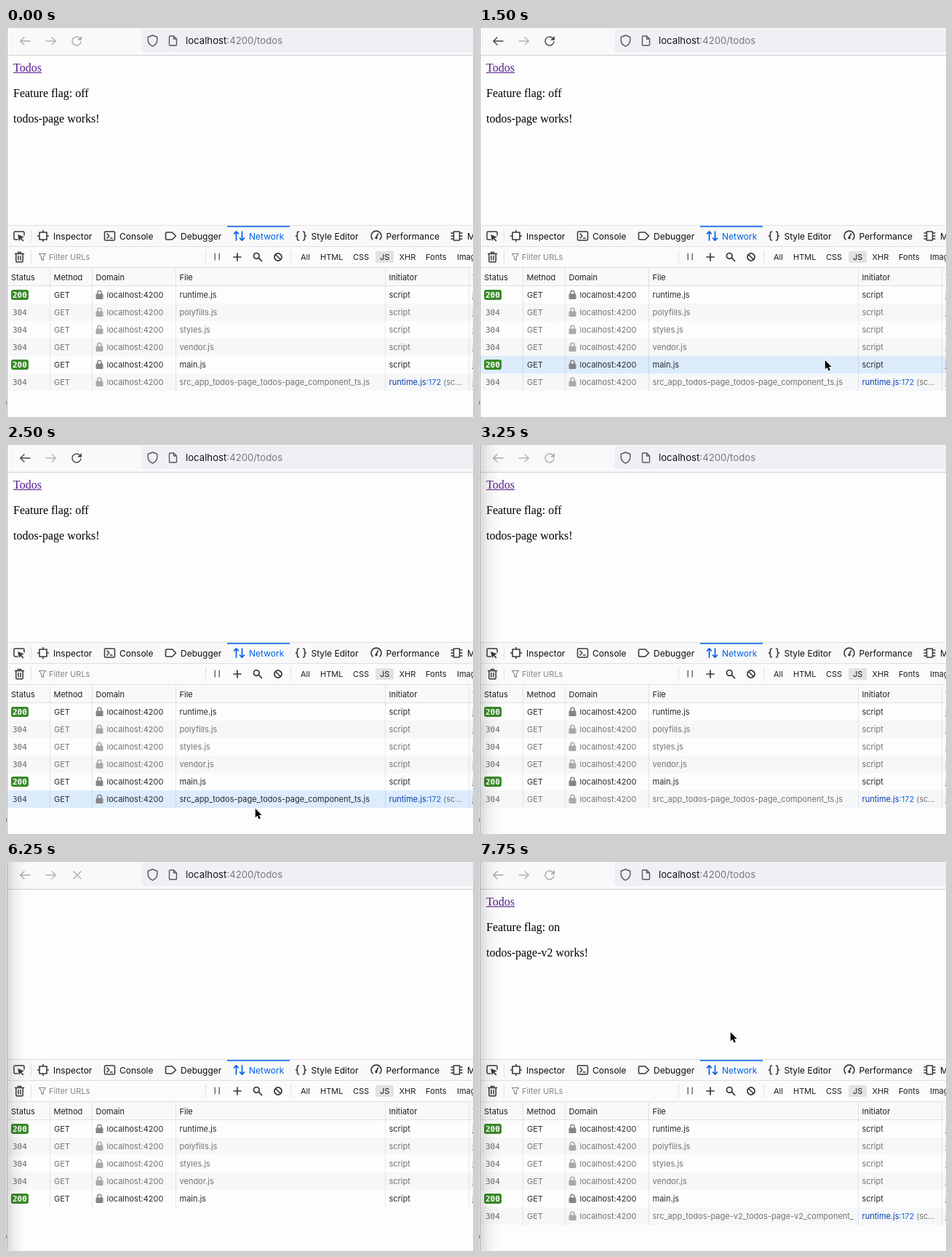
An HTML page with a canvas for the animation above (8000 ms loop, 642 by 535 pixels).

```html
<!DOCTYPE html>
<html lang="en">
<head>
<meta charset="utf-8">
<title>Feature flag and lazy routes</title>
<style>
html, body { margin: 0; width: 100%; height: 100%; overflow: hidden; background: #fdfdfd; }
canvas { display: block; }
</style>
</head>
<body>
<canvas id="stage" width="642" height="535"></canvas>
<script>
const ctx = document.getElementById('stage').getContext('2d');
const W = 642, H = 535, LOOP = 8000;
const UI = 'Inter, sans-serif', MONO = '"DejaVu Sans Mono", monospace', SERIF = '"Liberation Serif", serif';
const INK = '#0c0c0d', ICON = '#38383d', GRAY = '#737373', RULE = '#e0e0e2', BLUE = '#0060df';

// Pointer track: [time, x, y], hidden where x is missing
const POINTER = [
  [0], [250, 635, 149], [500, 541, 172], [1000, 495, 157], [1250, 455, 274],
  [1500, 475, 456], [1750, 408, 489], [2000, 336, 495], [2250, 354, 488],
  [2500, 342, 499], [2750], [7750, 345, 233]
];
const COLUMNS = [60, 118, 233, 521, 636];
const FILES = ['runtime.js', 'polyfills.js', 'styles.js', 'vendor.js', 'main.js'];

const within = (t, a, b) => t >= a && t < b;

function rect(x, y, w, h, color, r = 0) {
  ctx.fillStyle = color;
  ctx.beginPath();
  ctx.roundRect(x, y, w, h, r);
  ctx.fill();
}

function text(s, x, y, size = 11, color = INK, family = UI, weight = 400) {
  ctx.font = `${weight} ${size}px ${family}`;
  ctx.fillStyle = color;
  ctx.fillText(s, x, y);
  return x + ctx.measureText(s).width;
}

// Strokes (or fills) an SVG path placed at x, y
function icon(d, x, y, color = ICON, width = 1.5, filled = false) {
  ctx.save();
  ctx.translate(x, y);
  ctx.lineWidth = width;
  ctx.lineCap = ctx.lineJoin = 'round';
  ctx.strokeStyle = ctx.fillStyle = color;
  const p = new Path2D(d);
  if (filled) ctx.fill(p); else ctx.stroke(p);
  ctx.restore();
}

function reload(mode, color) {
  if (mode === 'stop') {
    icon('M-5 -5L5 5M5 -5L-5 5', 98, 18, color, 1.4);
  } else if (mode === 'turn') {
    icon('M5.5 2A6 6 0 1 1 5.6 -2', 97, 18, color, 1.4);
    icon('M2.5 -1H10L6.3 3.5Z', 97, 18, color, 1, true);
  } else {
    icon('M5.9 1A6 6 0 1 1 4 -4.4', 97, 18, color, 1.4);
    icon('M7 -7V-1.2H1.2Z', 97, 18, color, 1, true);
  }
}

function browserBar(t) {
  rect(2, 0, W, 37, '#f9f9fb');
  rect(2, 37, W, 1, '#cfcfd3');
  const active = within(t, 500, 3250);
  const ink = active ? '#45454b' : '#a9a9ae';
  icon('M7 0H-6M-1 -5L-6.3 0L-1 5', 26, 18, ink, 1.4);
  icon('M-7 0H6M1 -5L6.3 0L1 5', 62, 18, '#b4b4b9', 1.4);
  const mode = within(t, 6250, 6750) ? 'stop'
    : within(t, 6000, 6250) || within(t, 6750, 7000) ? 'turn' : 'idle';
  reload(mode, ink);

  rect(186, 1, W, 32, '#f0f0f4', 4);
  icon('M0 -7.5L6.3 -5V-1C6.3 3 4 6 0 7.7C-4 6 -6.3 3 -6.3 -1V-5Z', 201.5, 17.5, '#56565e', 1.4);
  icon('M-5 -5.5Q-5 -6.5 -4 -6.5H1L5 -2.5V5.5Q5 6.5 4 6.5H-4Q-5 6.5 -5 5.5ZM1 -6.5V-2.5H5', 229.5, 17.5, '#56565e', 1.4);
  const x = text('localhost', 247, 22, 13.2, '#15141a');
  text(':4200/todos', x, 22, 13.2, '#77777f');
}

function page(t) {
  if (within(t, 6250, 6500)) return;
  const on = t >= 6500;
  text('Todos', 10, 60, 16, '#551a8b', SERIF);
  rect(10, 61, 39, 1, '#551a8b');
  text('Feature flag: ' + (on ? 'on' : 'off'), 10, 95, 16, '#000', SERIF);
  text(on ? 'todos-page-v2 works!' : 'todos-page works!', 10, 130, 16, '#000', SERIF);
}

function tabs() {
  rect(2, 271, W, 30, '#f9f9fa');
  rect(2, 271, W, 1, RULE);
  rect(2, 300, W, 1, RULE);
  rect(304, 272, 86, 2, '#3a83f1');
  rect(34, 277, 1, 18, RULE);
  icon('M-2 5H-5.5Q-7 5 -7 3.5V-4.5Q-7 -6 -5.5 -6H5.5Q7 -6 7 -4.5V-1', 18, 286);
  icon('M-2 -2L7 1.5L3.2 3L6.5 6.5L5 7.5L2 4L0 7Z', 18, 286, ICON, 1, true);
  icon('M-5 -5H5V5H-5ZM0 -7.5V-5M0 7.5V5M-7.5 0H-5M7.5 0H5', 51, 286, ICON, 1.6);
  icon('M-7 -4.5Q-7 -6 -5.5 -6H5.5Q7 -6 7 -4.5V4.5Q7 6 5.5 6H-5.5Q-7 6 -7 4.5ZM-3.5 -3L-.7 0L-3.5 3M1 3H3.5', 142.5, 286);
  icon('M-7 -3.5Q-7 -5 -5.5 -5H2L7 0L2 5H-5.5Q-7 5 -7 3.5Z', 226.5, 286, ICON, 1.6);
  icon('M-4 6V-6M-7 -3L-4 -6.2L-1 -3M4 -6V6M1 3L4 6.2L7 3', 320.5, 286, BLUE, 1.7);
  icon('M-3 -6Q-5 -6 -5 -4V-2Q-5 0 -7 0Q-5 0 -5 2V4Q-5 6 -3 6M3 -6Q5 -6 5 -4V-2Q5 0 7 0Q5 0 5 2V4Q5 6 3 6', 405.5, 286, ICON, 1.6);
  icon('M-5 5A7 7 0 1 1 5 5M0 1.5L2.5 -3', 509, 286, ICON, 1.6);
  icon('M0 .7A1.8 1.8 0 1 0 .1 .7Z', 509, 286, ICON, 1, true);
  icon('M-4 -6H4V6H-4ZM-7.5 -4H-4M-7.5 0H-4M-7.5 4H-4M7.5 -4H4M7.5 0H4M7.5 4H4', 619.5, 286);
  const names = [['Inspector', 65], ['Console', 156], ['Debugger', 240], ['Network', 334],
    ['Style Editor', 419.5], ['Performance', 522.5], ['Memory', 634]];
  for (const [s, x] of names) text(s, x, 290.5, 12, s === 'Network' ? BLUE : INK);
}

function filters() {
  rect(2, 301, W, 28, '#fbfbfc');
  rect(2, 329, W, 1, RULE);
  for (const x of [34, 274, 391]) rect(x, 306, 1, 18, RULE);
  icon('M-6 -4.5H6M-2 -4.5V-6.5H2V-4.5M-4.7 -4.5V5Q-4.7 6.8 -3 6.8H3Q4.7 6.8 4.7 5V-4.5M-1.6 -1.5V4M1.6 -1.5V4', 18.5, 315);
  icon('M-4.5 -4.5H4.5L1.3 0V4.5L-1.3 3V0Z', 50, 315, '#85858a', 1.1);
  text('Filter URLs', 59, 319, 11, '#85858a');
  icon('M-3 -4.5V4.5M3 -4.5V4.5', 290.2, 314.5, ICON, 1.1);
  icon('M-5 0H5M0 -5V5', 318, 315, ICON, 1.7);
  icon('M2.2 -1.5A3.9 3.9 0 1 1 2.2 -1.6M1.3 1.2L5.6 5.6', 346, 315, ICON, 1.7);
  icon('M5 0A5 5 0 1 1 5 -.01M-3.5 -3.5L3.5 3.5', 374, 315, ICON, 1.7);
  rect(508, 307, 25, 16, '#e2e2e5', 2);
  const names = [['All', 405], ['HTML', 432], ['CSS', 477], ['JS', 514], ['XHR', 540.5],
    ['Fonts', 577], ['Images', 620]];
  for (const [s, x] of names) text(s, x, 319, 11, '#1d1d20');
}

function lock(y, color) {
  rect(123.5, y - 1.5, 10, 7.5, color, 1.2);
  icon('M-2.7 -1V-3A2.7 2.7 0 0 1 2.7 -3V-1', 128.5, y, color, 1.5);
}

function row(i, file, hover) {
  const mid = 367 + i * 24, base = mid + 4;
  const fresh = i === 0 || i === 4;
  rect(2, mid - 12, W, 24, hover ? '#dcecfd' : i % 2 ? '#f6f7f8' : '#fdfdfd');
  const ink = fresh || hover ? '#2a2a2e' : GRAY;
  if (fresh) {
    rect(7, mid - 7, 24, 14, '#3a8a29', 3);
    text('200', 9, base, 11, '#fff', MONO, 700);
  } else {
    text('304', 9, base, 11, hover ? '#38383d' : '#66666b', MONO);
  }
  text('GET', 66, base, 11, ink);
  lock(mid, fresh || hover ? '#858589' : '#a9a9ac');
  text('localhost:4200', 138.5, base, 11, ink);
  ctx.save();
  ctx.beginPath();
  ctx.rect(233, mid - 12, 288, 24);
  ctx.clip();
  text(file, 238.5, base, 11, ink);
  ctx.restore();
  if (i === 5) {
    let x = text('runtime.js', 526.5, base, 11, '#0b3fae');
    x = text(':172', x, base, 11, '#1a66dc');
    text(' (sc…', x, base, 11, GRAY);
  } else {
    text('script', 526.5, base, 11, ink);
  }
  text('js', 641, base, 11, ink);
}

function table(t) {
  rect(2, 330, W, 24, '#f9f9fa');
  rect(2, 354, W, 1, RULE);
  const heads = [['Status', 7], ['Method', 65.5], ['Domain', 123.5], ['File', 238.5], ['Initiator', 526.5], ['Type', 641]];
  for (const [s, x] of heads) text(s, x, 347, 11, '#1d1d20');

  const hover = within(t, 1500, 1750) ? 4 : within(t, 1750, 2750) ? 5 : -1;
  const name = t >= 6500 ? 'src_app_todos-page-v2_todos-page-v2_component_'
    : 'src_app_todos-page_todos-page_component_ts.js';
  const files = within(t, 6250, 6500) ? FILES : [...FILES, name];
  files.forEach((f, i) => row(i, f, i === hover));
  for (const x of COLUMNS) rect(x, 330, 1, 25 + files.length * 24, 'rgba(12,12,13,.09)');
}

function leftEdge(t) {
  if (t >= 3250) {
    const g = ctx.createLinearGradient(2, 0, 28, 0);
    g.addColorStop(0, 'rgba(0,0,0,.14)');
    g.addColorStop(.4, 'rgba(0,0,0,.05)');
    g.addColorStop(1, 'rgba(0,0,0,0)');
    ctx.fillStyle = g;
    ctx.fillRect(2, 0, 26, H);
  }
  rect(0, 0, 1, H, '#ececee');
  rect(1, 0, 1, H, '#b0b0b3');
  rect(0, 513, 1, 5, '#8c8c90');
}

function pointer(t) {
  const [, x, y] = POINTER.filter(p => p[0] <= t).pop();
  if (x === undefined) return;
  const d = 'M.8 1V13.2L3.6 10.7L5.7 15.5L7.8 14.6L5.8 9.9H9.6Z';
  icon(d, x, y, '#fff', 1.8);
  icon(d, x, y, '#000', 1, true);
}

function frame(now) {
  const t = now % LOOP;
  rect(0, 0, W, H, '#fdfdfd');
  browserBar(t);
  page(t);
  tabs();
  filters();
  table(t);
  leftEdge(t);
  pointer(t);
}

const start = performance.now();
function tick() {
  frame(performance.now() - start);
  requestAnimationFrame(tick);
}
tick();
</script>
</body>
</html>
```
